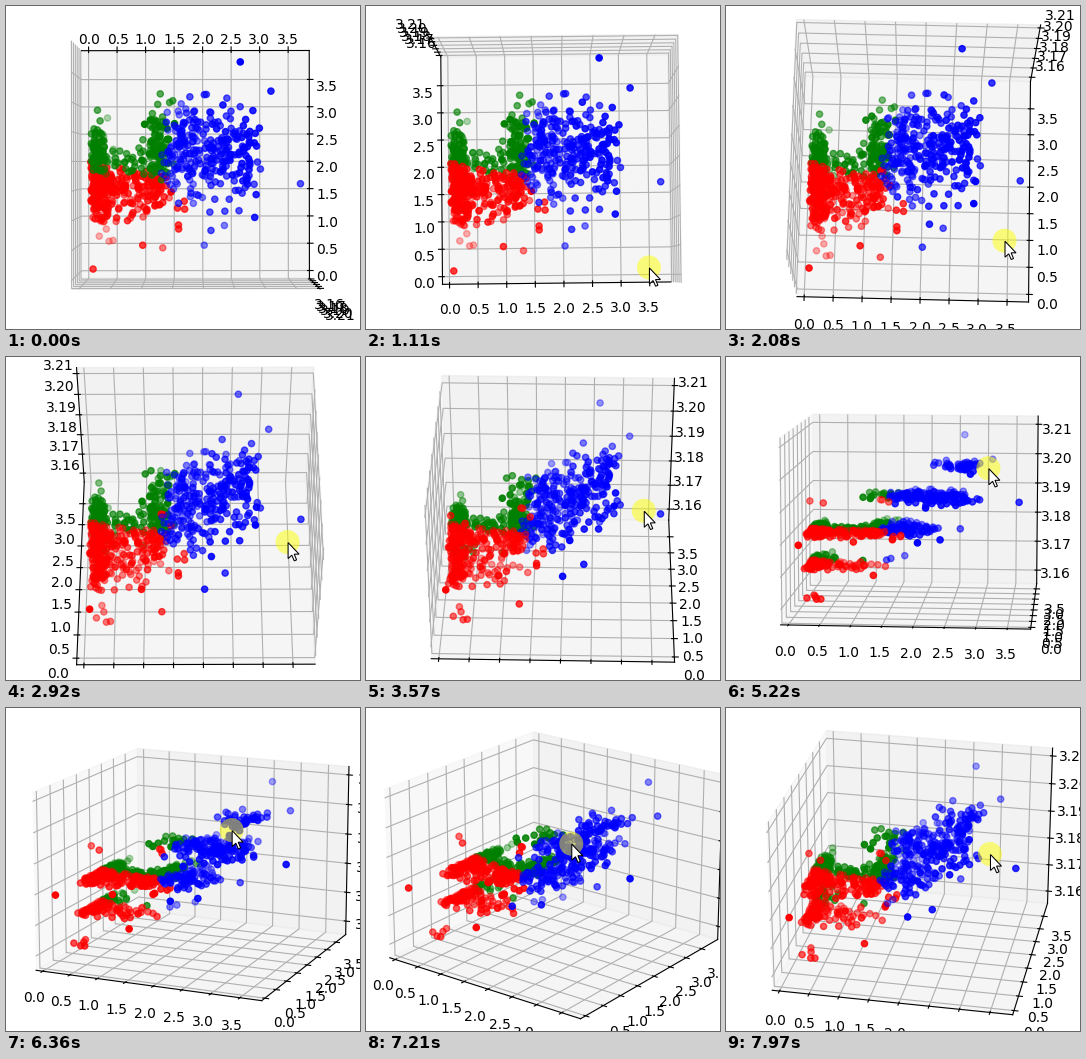
A matplotlib script that plays this animation: 354 px wide and 323 px high, repeating every 7990 ms.

```python
import numpy as np
import matplotlib.pyplot as plt
from matplotlib.animation import FuncAnimation
from matplotlib.patches import Circle, Polygon

W, H, DPI = 354, 323, 100
FRAMES, STEP = 170, 47          # 7990 ms per loop
SIDE = 369.6                    # edge of the square 3D viewport
LEFT, BOTTOM = -0.3, -25.3

GAIN = 180 / SIDE               # degrees turned per dragged pixel
LAG = 90                        # the view follows the pointer late
DRAGS = [(800, 4620), (5030, 8000)]   # press and release times
SHOW = 100

# pointer waypoints: time, x, y
PATH = np.array([
    (SHOW, 308, 337), (430, 293, 289), (590, 293, 289),
    (800, 281.3, 270.2), (1150, 283, 260), (1290, 281.3, 254),
    (1990, 278.4, 238.5), (2920, 281.6, 186), (4170, 274, 123),
    (4620, 274, 101), (4710, 270, 107), (5080, 270, 107),
    (5225, 263, 111), (6360, 226, 122), (6910, 197, 131),
    (7880, 254, 145), (7970, 264, 146),
])
TIMES, SPOTS = PATH[:, 0], PATH[:, 1:]

CENTRES = np.array([(0.6, 1.35), (0.75, 2.35), (2.1, 2.2)])
COLOURS = ["r", "g", "b"]


def slopes(t, v):
    """Tangents for monotone cubic interpolation."""
    d = np.diff(v, axis=0) / np.diff(t)[:, None]
    prod, total = d[:-1] * d[1:], d[:-1] + d[1:]
    m = np.zeros_like(v)
    np.divide(2 * prod, total, out=m[1:-1], where=prod > 0)
    return m


SLOPES = slopes(TIMES, SPOTS)


def pointer(t):
    t = np.clip(t, TIMES[0], TIMES[-1])
    k = min(np.searchsorted(TIMES, t, "right"), len(TIMES) - 1) - 1
    h = TIMES[k + 1] - TIMES[k]
    s = (t - TIMES[k]) / h
    ease = s * s * (3 - 2 * s)
    return (SPOTS[k] + (SPOTS[k + 1] - SPOTS[k]) * ease
            + h * s * (1 - s) ** 2 * SLOPES[k]
            - h * s * s * (1 - s) * SLOPES[k + 1])


def view(t):
    """Elevation and azimuth after all dragging up to time t."""
    dx, dy = sum(pointer(np.clip(t - LAG, press, release)) - pointer(press)
                 for press, release in DRAGS)
    # just past the pole, so that the near edges carry the ticks at rest
    return 90.05 + GAIN * dy, -90.05 - GAIN * dx


def make_points():
    rng = np.random.default_rng(11)
    mid = rng.uniform(0.3, 1.4, 210)
    groups = [
        (0.1 + 0.32 * rng.beta(1.5, 2.5, 265), rng.normal(1.72, 0.45, 265)),
        (mid, rng.normal(1.5 + 0.2 * mid, 0.33)),
        (rng.uniform(1.1, 1.42, 80), rng.normal(2.2, 0.38, 80)),
        (1.38 + 1.6 * rng.beta(1.2, 1.6, 300), rng.normal(2.2, 0.47, 300)),
    ]
    x, y = (np.concatenate(part) for part in zip(*groups))
    level = np.rint(1.6 + 0.25 * x ** 2 + 0.3 * (y - 1.75)
                    + rng.normal(0, 0.36, x.size)).clip(1, 4)
    inside = (y > 0.75) & (y < 3.2) & (x + y > 1.1) & (y > 1.9 - 0.5 * x ** 2 * (x > 1.8) - 1.15 * (x <= 1.8))
    lone = [(2.6, 3.68, 4.7), (3.11, 3.2, 4), (3.62, 1.61, 3), (2.02, 0.52, 2),
            (0.98, 0.52, 2), (1.31, 0.45, 1), (0.14, 0.1, 2)]
    low = np.column_stack([rng.uniform(0.1, 0.45, 5),
                           rng.uniform(0.4, 0.95, 5), np.full(5, 0.2)])
    pts = np.vstack([np.column_stack([x, y, level])[inside], lone, low])
    blur = rng.normal(0, 0.07, (len(pts), 1, 2))
    dist = np.linalg.norm(pts[:, None, :2] + blur - CENTRES, axis=2)
    pts[:, 2] = 3.159 + 0.0102 * pts[:, 2]
    return pts, dist.argmin(axis=1)


fig = plt.figure(figsize=(W / DPI, H / DPI), dpi=DPI, facecolor="white")
ax = fig.add_axes([LEFT / W, BOTTOM / H, SIDE / W, SIDE / H], projection="3d")

points, labels = make_points()
for i, colour in enumerate(COLOURS):
    ax.scatter(*points[labels == i].T, c=colour, s=20)

ax.set_xticks(np.arange(8) / 2)
ax.set_yticks(np.arange(8) / 2)
ax.set_zticks(3.16 + np.arange(6) / 100)
ax.set_xlim(-0.123, 3.87)
ax.set_ylim(-0.14, 4.03)
ax.set_zlim(3.1553, 3.2128)

# pointer layer in pixel coordinates
top = fig.add_axes([0, 0, 1, 1], zorder=5)
top.set_xlim(0, W)
top.set_ylim(H, 0)
top.axis("off")

ARROW = np.array([(0, 0), (0, 16), (3.7, 12.6), (6.2, 18.3),
                  (8.5, 17.3), (6.1, 11.6), (11, 11.6)])
halo = top.add_patch(Circle((0, 0), 12, fc="yellow", alpha=0.5, lw=0))
arrow = top.add_patch(Polygon(ARROW, closed=True, fc="white", ec="black",
                              lw=0.75))


def draw(i):
    t = (i + 0.5) * STEP
    elev, azim = view(t)
    ax.view_init(elev=elev, azim=azim)
    spot = pointer(t)
    halo.center = spot
    arrow.set_xy(ARROW + spot + 0.5)
    for part in (halo, arrow):
        part.set_visible(t >= SHOW)
    return halo, arrow


anim = FuncAnimation(fig, draw, frames=FRAMES, interval=STEP, repeat=True,
                     repeat_delay=0, blit=False)
plt.show()
```
